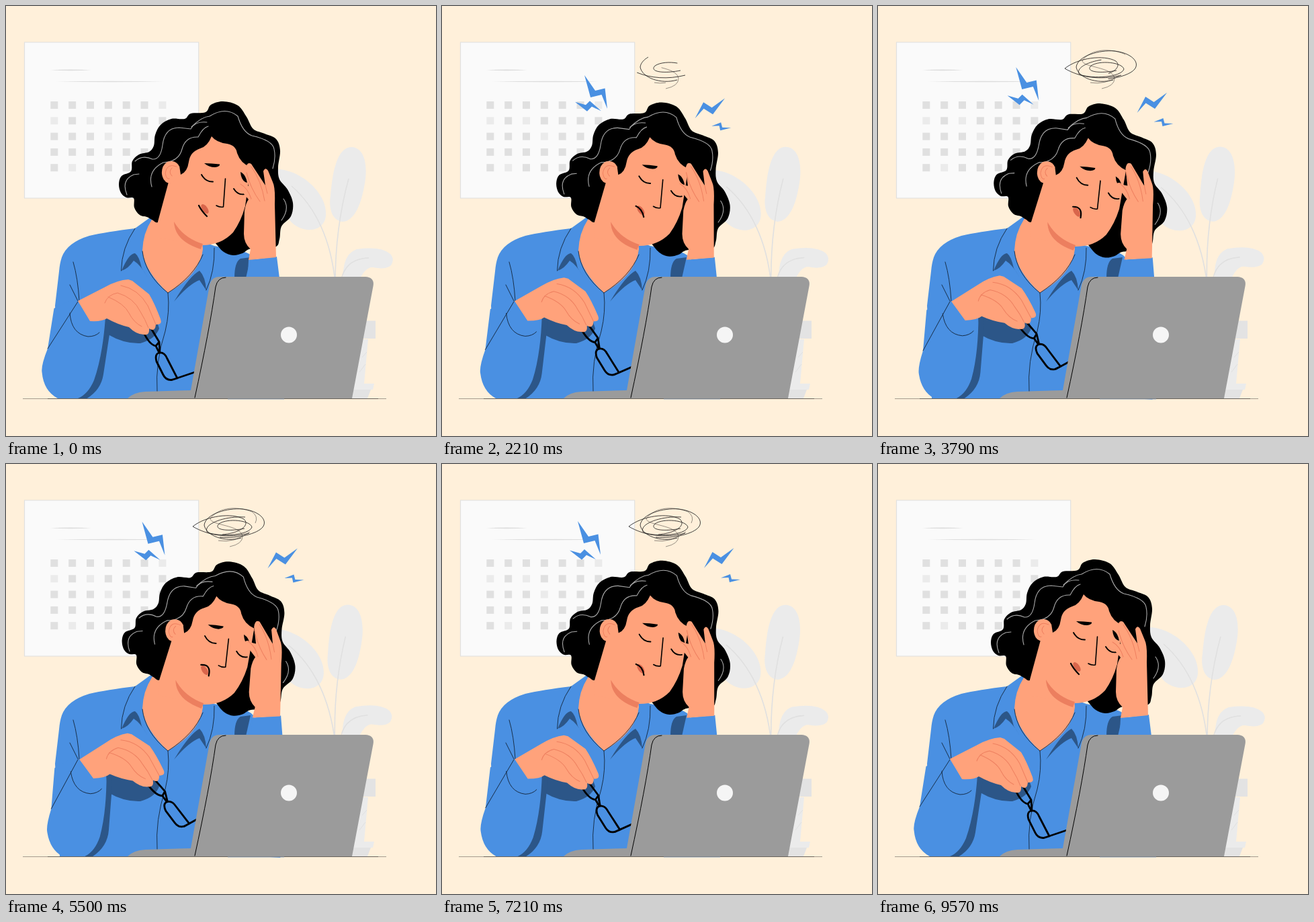
Animation of 640x640 px, one loop 9640 ms. Source, as an HTML page:

```html
<!DOCTYPE html>
<html lang="en">
<head>
<meta charset="utf-8">
<title>Tired at the desk</title>
<style>
html, body { margin: 0; height: 100%; overflow: hidden; background: #fff0da; }
svg { display: block; width: 100vw; height: 100vh; }
.line { fill: none; stroke: #000; stroke-linecap: round; stroke-linejoin: round; }
.seam { fill: none; stroke: #14263c; stroke-width: .9; stroke-linecap: round; }
.fold { fill: none; stroke: #ee8060; stroke-width: 1; stroke-linecap: round; }
.shine { fill: none; stroke: #a9a9a9; stroke-width: 1.1; stroke-linecap: round; }
.skin { fill: #ffa27b; }
.shirt { fill: #4a90e2; }
.shade { fill: #2c5688; }
.leaf { fill: #ebebeb; }
.stem { fill: none; stroke: #e0e0e0; stroke-width: 1.6; }
#scribble path { fill: none; stroke: #222; stroke-width: .85; }
</style>
</head>
<body>
<svg viewBox="0 0 640 640">
  <clipPath id="desk"><path d="M0 0H640V584H0Z"/></clipPath>

  <g id="calendar">
    <path d="M27.5 54H286.700V286H27.500Z" fill="#fafafa" stroke="#e0e0e0" stroke-width="1.2"/>
    <path d="M66 95.300Q96 93.800 127 95.300Q96 97 66 95.300M74 112.500Q155 111.200 236 112.500Q155 114 74 112.500" fill="#dcdcdc"/>
  </g>

  <g id="plant">
    <path class="leaf" d="M404 243C440 244 479 280 476 312C474 336 444 340 425 322C405 300 394 262 404 243Z"/>
    <path class="leaf" d="M515 210C533 211 539 236 534 264C528 300 517 320 501 321C485 319 480 301 483 282C486 244 494 209 515 210Z"/>
    <path class="leaf" d="M502 412Q499 370 522 362Q558 357 572 369Q579 377 573 386Q565 393 546 389Q534 388 524 412Z"/>
    <path class="stem" d="M425 268C462 300 484 350 490 412M510 257Q490 330 490 412M500 403Q508 376 540 375"/>
  </g>
  <path d="M536 468.500H550V495H531Z" fill="#e3e3e3"/>
  <path d="M530 496H539L533 562H517Z" fill="#ebebeb"/>
  <path d="M530 523L537 515M526 545L535 533" stroke="#e0e0e0"/>
  <path d="M517 562H548L546 571H515Z" fill="#ebebeb"/>
  <path d="M515 571H543L538 584H513Z" fill="#e3e3e3"/>

  <g id="scribble">
    <path pathLength="1" d="M362 103C330 111 300 106 278 93C298 77 336 72 354 82C364 91 348 103 322 105"/>
    <path pathLength="1" d="M350 110C326 117 298 107 295 91C297 74 330 65 352 67C378 70 390 84 382 94C374 104 345 111 318 109"/>
    <path pathLength="1" d="M355 96C330 101 308 98 317 89C330 80 364 84 366 94C362 106 320 109 300 102C291 90 325 77 356 79"/>
    <path pathLength="1" d="M333 123Q352 119 352 108C350 90 304 92 304 81C318 63 345 63 366 71Q376 78 371 88" opacity=".55"/>
    <path pathLength="1" d="M316 114Q340 118 363 101" opacity=".6"/>
  </g>
  <g id="bolts" fill="#4a90e2">
    <path d="M202 85L218 108L232.500 104.500L236 135L227.500 114L211 118Z"/>
    <path d="M190 128.500L206 133L212 127L229 142L215 135.500L208 142.500Z"/>
    <path d="M390 155L402.500 131L415 139L434.500 125L416.500 149L403 140.500Z"/>
    <path d="M415 169.500L429 164L431 171.500L444 172L428 176L426.500 169Z"/>
  </g>

  <g id="body">
    <path class="shirt" d="M217 313L192 331Q150 336 124 342Q91 352 83 374Q80 383 79 395L73 446L80 584H300L345 405H378L368 374Q362 367 350 365L310 357L290 350Z"/>
    <path class="shade" d="M340 405Q340 381 349 376L364 374L357 405Z"/>
    <path class="skin" d="M228 300L217 318Q204 338 203 364Q206 394 241 427Q289 399 293 362L290 320Z"/>
    <path class="shade" d="M172 394Q183 368 192 368Q198 372 202 390L211 404Q200 385 190 379Q182 391 172 394Z"/>
    <path class="shade" d="M250 440Q273 402 288 394Q297 403 298 423L288 408Q272 414 250 440Z"/>
    <path class="seam" d="M192 331Q172 360 171.500 394M203 365Q207 400 241 427Q244 455 237 484Q222 530 225 574M241 427Q280 402 293 370M310 360Q311 395 298 423"/>
  </g>

  <path class="shade" d="M149 462L152 489Q176 503 200 502Q222 496 228 480L220 455Z"/>
  <g clip-path="url(#desk)">
    <g id="sleeve">
      <path class="shirt" d="M100 436L71.500 450L62 510Q52 535 53.500 545Q56 573 77 584L84 600H116L130 560L147 465L107 440Z"/>
      <path class="shade" d="M148 463Q144 520 131 557Q122 578 107 584L113 588Q141 575 145 548L154 489L156 466Z"/>
      <path class="seam" d="M107 440L62 510M95 457Q97 488 122 492Q133 492 139 486"/>
    </g>
  </g>
  <path class="seam" d="M100 381Q107 405 109 439M95 415L107 439"/>

  <g id="leftHand">
    <g id="glasses" class="line" stroke-width="2.8">
      <path d="M204 484Q213 504 223 506L228 500L216 480M223 506L228 516M228 500L229 516"/>
      <path d="M228 516Q221 518 224 529L234 549Q238 557 246 556.500L255 554L240 525Q236 515 228 516ZM247 556.500L284 544"/>
    </g>
    <path class="skin" d="M107 439L148 418Q166 408 182 407L188 409L213 429Q221 442 230 466Q233 475 223 474Q222 486 213 480Q214 491 205 489Q194 489 183 478Q166 474 150 465Q143 470 125 469Z"/>
    <path class="fold" d="M147 442Q151 430 166 427Q190 434 200 455Q207 466 212 479M171 416Q197 421 211 446L223 474M152 433Q176 443 183 457Q190 471 202 477"/>
  </g>

  <g id="head">
    <path id="hair"/>
    <path class="shine" d="M180 281Q171 259 190 251L198 250M192 231Q203 221 218 228Q230 229 233 207Q236 181 258 181L275 183Q281 171 299 173M276 180Q291 165 303 164Q327 149 345 164Q352 188 366 193Q397 200 399 213Q402 226 397 242M217 269Q210 245 234 233Q257 232 262 213Q267 194 286 195Q293 181 301 179M413 287Q423 301 410 319"/>
    <path class="skin" d="M242 262L226 321L226 345L292 356Q320 356 338 337Q350 320 356 298L364 240Q349 234 344 219Q342 207 329 205Q313 203 306 194Q300 209 289 212Q274 217 272 232Q270 247 260 251L258 238Z"/>
    <path class="skin" d="M258 239Q253 228 240 232Q231 238 232 250Q234 264 246 264L256 255Z"/>
    <path class="fold" d="M254 239Q239 233 237 249Q239 259 243 257M247 241Q241 247 247 253"/>
    <path d="M250 321Q264 345 293 354L290 362Q251 350 250 321Z" fill="#ec7f5f"/>
    <g id="eyes">
      <path d="M295 234Q306 234 318 235.500Q319 239 311 240Q302 240 295 234ZM349 247Q357 251 359 263Q350 261 349 247Z"/>
      <path class="line" d="M291 251Q297 262 308 261.500M339 272Q345 282 355 280" stroke-width="1.9"/>
    </g>
    <path class="line" d="M326.500 257L323.500 299Q318 300 313 297" stroke-width="1.6"/>
    <ellipse id="lip" rx="4" ry="8" fill="#d9664c"/>
    <path id="mouth" class="line" stroke-width="2.200"/>
  </g>

  <g id="rightArm">
    <path class="shirt" d="M361 378L403 373L407 405L412 584H340L358 440Z"/>
    <path class="skin" d="M361 378L364 362Q354 353 354 339L355 305Q357 293 361 288L345 269Q343 264 349 264L356 267L361 268L357 243Q358 231 365 235L386 267L383 246Q386 239 390 245L397 262Q401 270 400 295L402 374Z"/>
    <path class="fold" d="M365 239Q380 260 385 290M358 248Q364 272 378 291M386 267L389 279M349 265Q360 271 365 287"/>
  </g>

  <path d="M330 584.500H414" stroke="#3972b8" stroke-width="1.500"/>
  <path d="M181 584Q190 575 207 574L275 572L303 415Q306 403 318 403H535Q549 404 546.500 417L515 584Z" fill="#9b9b9b"/>
  <path class="line" d="M327 404Q315 404 312 418Q303 482 281 583" stroke-width="1"/>
  <circle cx="421" cy="489.500" r="12" fill="#f5f5f5"/>
  <path d="M25 584.500H566" stroke="#8d877d" stroke-width=".8"/>
  <path d="M62 584.500H330M414 584.500H554" stroke="#403e3a" stroke-width=".6"/>
</svg>
<script>
const LOOP = 9640;
const $ = id => document.getElementById(id);
const clamp = v => Math.min(1, Math.max(0, v));
const ramp = (t, from, to) => clamp((t - from) / (to - from));
const mix = (a, b, k) => a + (b - a) * k;
const move = (id, value) => $(id).setAttribute('transform', value);

// Closed Catmull-Rom curve through the given points
function smooth(points) {
  const n = points.length, at = i => points[(i + n) % n];
  return 'M' + points[0] + points.map((p, i) => {
    const a = at(i - 1), b = at(i + 1), c = at(i + 2);
    return 'C' + [p[0] + (b[0] - a[0]) / 6, p[1] + (b[1] - a[1]) / 6,
      b[0] - (c[0] - p[0]) / 6, b[1] - (c[1] - p[1]) / 6, ...b];
  }).join('') + 'Z';
}

const outline = `168,265 172,253 186,246 188,231 198,221 213,217 220,208 222,192 230,177
  246,168 266,168 275,160 297,158 305,147 323,142 345,148 358,165 368,183 385,190 402,198
  408,215 405,240 407,258 419,273 427,293 424,313 410,328 407,347 400,359 365,361 352,368
  338,371 324,366 311,352 290,325 245,275 236,295 227,321 217,318 210,314 199,311 191,300
  190,286 179,285 171,278`;
$('hair').setAttribute('d', smooth(outline.trim().split(/\s+/).map(p => p.split(',').map(Number))));

const pale = ['0,6', '1,0', '1,2', '2,3', '4,1'];
let days = '';
for (let row = 0; row < 5; row++)
  for (let col = 0; col < 7; col++)
    days += `<rect x="${66.3 + col * 26.85}" y="${142 + row * 23.3}" width="11" height="11"
      fill="${pale.includes(row + ',' + col) ? '#ebebeb' : '#e0e0e0'}"/>`;
$('calendar').insertAdjacentHTML('beforeend', days);

const strokes = [...$('scribble').children];
const bolts = [...$('bolts').children];
const boltStart = [[24, 43], [19, 34], [-32, 29], [-33, 22]];

function draw() {
  const t = performance.now() % LOOP;
  const sway = (1 - Math.cos(2 * Math.PI * t / LOOP)) / 2;

  move('plant', `rotate(${-1.6 * sway} 493 430)`);
  move('head', `rotate(${2.3 * sway} 240 385)`);
  move('eyes', `translate(0 ${3 * sway})`);
  move('rightArm', `rotate(${2.8 * sway} 375 505)`);
  move('sleeve', `rotate(${-4.5 * sway} 107 440)`);
  move('leftHand', `translate(${2.5 * sway} ${0.5 * sway}) rotate(${-5.7 * sway} 110 440)`);
  move('glasses', `rotate(${-5.2 * sway} 207 485)`);
  move('lip', `translate(${mix(296, 292.5, sway)} ${mix(302, 305, sway)}) rotate(-36)`);
  $('mouth').setAttribute('d', `M287 297Q${mix(291, 303, sway)} ${mix(305, 295, sway)} 299 313`);

  const drawn = ramp(t, 950, 4050) ** 1.2;
  for (const s of strokes) {
    s.style.strokeDasharray = `${drawn} 2`;
    s.style.visibility = drawn ? 'visible' : 'hidden';
  }
  $('scribble').style.opacity = 1 - ramp(t, 8600, 9500);

  const left = (1 - ramp(t, 500, 7300)) ** 3;
  bolts.forEach((b, i) => b.setAttribute('transform', `translate(${boltStart[i].map(d => d * left)})`));
  $('bolts').style.opacity = ramp(t, 500, 1100) * (1 - ramp(t, 7950, 8900));

  requestAnimationFrame(draw);
}
draw();
</script>
</body>
</html>
```
